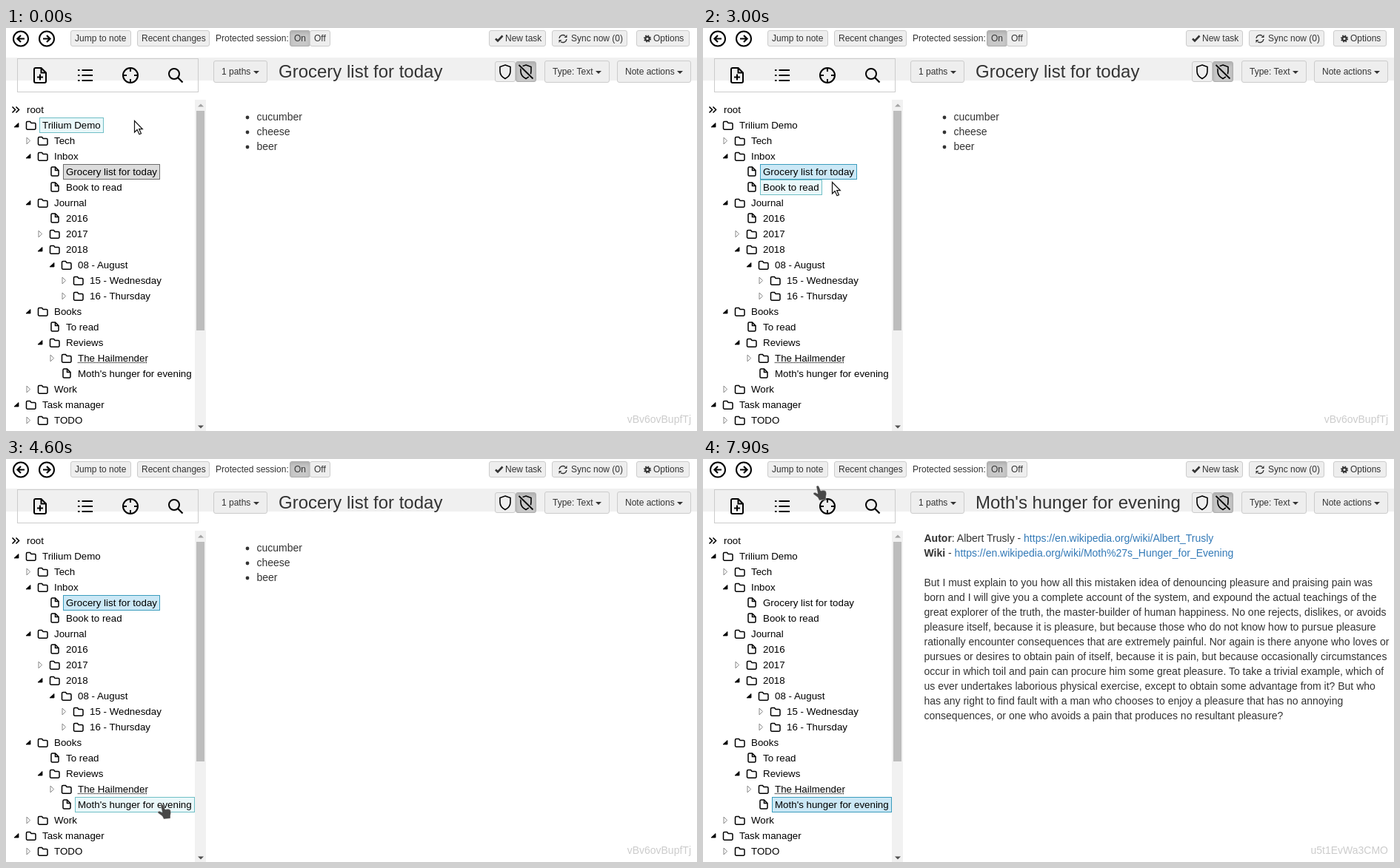
These frames come from a looping animation (933x545 px, 8 s). An HTML page:

```html
<!DOCTYPE html>
<html lang="en">
<head>
<meta charset="utf-8">
<title>Note tree</title>
<style>
html, body { margin: 0; width: 100%; height: 100%; overflow: hidden; background: #fff; }
body { position: relative; font: 14px/20px "Liberation Sans", Arial, sans-serif; color: #333; }
div, svg { position: absolute; box-sizing: border-box; white-space: pre; }
svg { left: 0; top: 0; width: 933px; height: 545px; }
#stage { width: 933px; height: 545px; overflow: hidden; }
#header { width: 933px; height: 31px; background: #f0f0f0; }
#tools { left: 15px; top: 41px; width: 245px; height: 46px; border: 1px solid #ccc; }
#track { left: 255px; top: 97px; width: 15px; height: 448px; background: #f1f1f1; }
#thumb { left: 257px; top: 112px; width: 11px; height: 297px; background: #bdbdbd; }
.small { font-size: 12px; }
.btn { background: #eee; border: 1px solid #ccc; border-radius: 3px; font-size: 12px; }
.btn.on { background: #c8c8c8; border-color: #adadad; box-shadow: inset 0 3px 5px rgba(0,0,0,.125); }
.caret::after { content: ""; display: inline-block; margin-left: 3.3px; vertical-align: middle;
  border: 4px solid transparent; border-top-color: #333; border-bottom: 0; }
.label { height: 21px; padding: 0 3px; border: 1px solid transparent; font-size: 13.333px; line-height: 19px; color: #000; }
.dotted { text-decoration: underline dotted; }
.label.hover { background: #eaf8fa; border-color: #70bfc6; }
.label.idle { background: #dcdcdc; border-color: #6c6c6c; }
.label.active { background: #cbe8f6; border-color: #3b9cbd; }
#title { left: 368px; top: 44px; font-size: 24px; line-height: 30px; }
#noteId { right: 8px; top: 519px; color: #ccc; }
a { color: #337ab7; }
</style>
</head>
<body>
<div id="stage">
  <div id="header"></div>
  <div id="tools"></div>
  <div id="track"></div>
  <div id="thumb"></div>
  <div id="title"></div>
  <div id="list" style="left:338.5px;top:110px">cucumber
cheese
beer</div>
  <div id="article" style="left:298.5px;top:97px"><b>Autor</b>: Albert Trusly - <a>https://en.wikipedia.org/wiki/Albert_Trusly</a>
<b>Wiki</b> - <a>https://en.wikipedia.org/wiki/Moth%27s_Hunger_for_Evening</a>

But I must explain to you how all this mistaken idea of denouncing pleasure and praising pain was
born and I will give you a complete account of the system, and expound the actual teachings of the
great explorer of the truth, the master-builder of human happiness. No one rejects, dislikes, or avoids
pleasure itself, because it is pleasure, but because those who do not know how to pursue pleasure
rationally encounter consequences that are extremely painful. Nor again is there anyone who loves or
pursues or desires to obtain pain of itself, because it is pain, but because occasionally circumstances
occur in which toil and pain can procure him some great pleasure. To take a trivial example, which of
us ever undertakes laborious physical exercise, except to obtain some advantage from it? But who
has any right to find fault with a man who chooses to enjoy a pleasure that has no annoying
consequences, or one who avoids a pain that produces no resultant pleasure?</div>
  <div id="noteId"></div>
</div>
<script>
const stage = document.getElementById('stage');
const byId = id => document.getElementById(id);

function box(cls, x, y, text, w, h) {
  const el = document.createElement('div');
  el.className = cls;
  el.textContent = text;
  el.style.left = x + 'px';
  el.style.top = y + 'px';
  if (w) el.style.width = w + 'px';
  if (h) { el.style.height = h + 'px'; el.style.lineHeight = h - 2 + 'px'; }
  stage.append(el);
  return el;
}

function button(x, y, w, h, text, pad, cls = '') {
  box('btn ' + cls, x, y, text, w, h).style.paddingLeft = pad + 'px';
}

button(87, 3, 82, 22, 'Jump to note', 5);
button(177, 3, 98, 22, 'Recent changes', 5);
box('small', 283, 4, 'Protected session:');
button(383, 3, 28, 22, 'On', 5, 'on');
button(410, 3, 28, 22, 'Off', 5);
button(652, 3, 77, 22, 'New task', 21);
button(737, 3, 102, 22, 'Sync now (0)', 25);
button(851, 3, 72, 22, 'Options', 22);
button(280, 44, 73, 30, '1 paths', 10, 'caret');
button(660, 45, 28, 28, '', 0);
button(688, 45, 28, 28, '', 0, 'on');
button(727, 44, 88, 30, 'Type: Text', 10, 'caret');
button(825, 44, 100, 30, 'Note actions', 10, 'caret');

// Rows: depth, kind (o open, c closed, d document), label
const article = "Moth's hunger for evening", grocery = 'Grocery list for today';
const rows = `0r root|1o Trilium Demo|2c Tech|2o Inbox|3d ${grocery}|3d Book to read|2o Journal|3d 2016|3c 2017
|3o 2018|4o 08 - August|5c 15 - Wednesday|5c 16 - Thursday|2o Books|3d To read|3o Reviews|4c The Hailmender
|4d ${article}|2c Work|1o Task manager|2c TODO|2c `.replace(/\n/g, '').split('|')
  .map(s => ({ depth: +s[0], kind: s[1], text: s.slice(3) }));

const path = (d, fill = 'none', stroke = '#000', width = 1.5) =>
  `<path d="${d}" fill="${fill}" stroke="${stroke}" stroke-width="${width}"/>`;
const at = (x, y, art) => `<g transform="translate(${x} ${y})">${art}</g>`;
const ring = (x, y, r, w) => `<circle cx="${x}" cy="${y}" r="${r}" fill="none" stroke="#000" stroke-width="${w}"/>`;

const folder = path('M1 3v7.2a1.5 1.5 0 0 0 1.5 1.5h9.5a1.5 1.5 0 0 0 1.5-1.5V4.4a1.5 1.5 0 0 0-1.5-1.5H7.6L6 1H2.5A1.5 1.5 0 0 0 1 2.5z');
const sheet = path('M6.5 1h-4A1.5 1.5 0 0 0 1 2.5v9A1.5 1.5 0 0 0 2.5 13h7A1.5 1.5 0 0 0 11 11.500V5.500zV5.500H11');
const opened = path('M3 -3v5.500h-6z', '#000', '#000', .8);
const closed = path('M-2 -4.500l4.500 4.500-4.500 4.500z', '#fff', '#888', 1);

let art = '';
rows.forEach((row, i) => {
  const x = row.depth ? 33 + 16 * row.depth : 28, y = 110.5 + 21 * i;
  row.label = box('label', x - 4, 100 + 21 * i, row.text);
  if (row.kind === 'r') art += path(`M8.500 ${y - 4}l4 4-4 4m5-8l4 4-4 4`, 'none', '#000', 1.6);
  else if (row.kind === 'd') art += at(x - 21, y - 7.5, sheet);
  else art += at(x - 22.5, y - 6, folder) + at(x - 35, y, row.kind === 'o' ? opened : closed);
});
rows[16].label.classList.add('dotted');

// Header icons
art += ring(20, 14.5, 10, 2) + path('M25 14.500h-9m4-4.500l-4.500 4.500 4.500 4.500', 'none', '#000', 2.2);
art += ring(55, 14.5, 10, 2) + path('M50 14.500h9m-4-4.500l4.500 4.500-4.500 4.500', 'none', '#000', 2.2);
art += path('M661 14.500l3 3 6.500-7', 'none', '#333', 2.6);
art += path('M747 14a5 5 0 0 1 8-3.500M757 15a5 5 0 0 1-8 3.500', 'none', '#333', 1.4)
  + path('M757.500 9v4h-4zM746.500 20v-4h4z', '#333', 'none');
art += `<g fill="none" stroke="#333"><circle cx="866" cy="14.5" r="2.7" stroke-width="2.2"/>
  <circle cx="866" cy="14.5" r="4.2" stroke-width="1.7" stroke-dasharray="1.65"/></g>`;

// Toolbar icons
art += path('M47.500 54H40a2 2 0 0 0-2 2v16a2 2 0 0 0 2 2h12a2 2 0 0 0 2-2V60.500zv6.500H54M46 62.500v8m-4-4h8', 'none', '#000', 2);
art += path('M97 57h2.500m3 0h14.500m-20 7h2.500m3 0h14.500m-20 7h2.500m3 0h14.500', 'none', '#000', 2);
art += ring(168, 64, 10, 2) + path('M168 54v5m0 10v5m-10-10h5m10 0h5', 'none', '#000', 2);
art += ring(227, 62, 7, 2) + path('M232 67l6.500 6.500', 'none', '#000', 2.2);

// Shields
const shield = path('M0 -9l7 2.500v6C7 4 4 7.500 0 9.500-4 7.500-7 4-7 -.500v-6z', 'none', '#000', 1.6);
art += at(674, 59, shield) + at(702, 59, shield + path('M-9 -9l18 18', 'none', '#c8c8c8', 4.5) + path('M-9.500 -9l19 18.500', 'none', '#000', 1.8));

// Scrollbar arrows and list bullets
art += path('M259 106.500l4-4 4 4z', '#a3a3a3', 'none') + path('M259 537.500l4 4 4-4z', '#505050', 'none');
art += '<g id="bullets" fill="#333">' + [0, 1, 2].map(i => `<circle cx="326" cy="${121 + 20 * i}" r="2.4"/>`).join('') + '</g>';

art += '<g id="cursor">'
  + '<g id="arrow">' + path('M.5 .5v15.500l3.600-3.400 2.900 6.200 2.500-1.100-2.800-6.100h4.600z', '#fff', '#111', 1.2) + '</g>'
  + '<g id="hand">' + path('M-2 1.500Q-1 -1 1.200 .6L4 7Q8 5.500 11 7.500 12.500 11 11 15V19L2 20 0 16-6 11.500Q-6.500 9-3.500 9.200L0 11z', '#484848', '#fff', .4) + '</g>'
  + '<g id="beam">' + path('M-3 -8.500h2.500l.5 .5 .5-.5h2.500M0 -8v16M-3 8.500h2.500l.5-.5 .5 .5h2.500', 'none', '#333', 1) + '</g></g>';
stage.insertAdjacentHTML('beforeend', `<svg viewBox="0 0 933 545">${art}</svg>`);

// Pointer keys: time, x, y
const keys = [
  [0, 173, 125], [200, 173, 125], [500, 174, 183], [600, 174, 183], [900, 174, 192],
  [2800, 174, 192], [3600, 174, 257], [3700, 185, 282], [4600, 211, 467],
  [6100, 211, 467], [6300, 258, 466], [6400, 258, 466], [6600, 310, 465], [6700, 310, 465],
  [6800, 333, 414], [6900, 333, 414], [7000, 347, 326], [7100, 347, 326],
  [7600, 206, 110], [7700, 175, 46], [7800, 175, 46], [7900, 155, 36], [8000, 155, 36]
];
const LOOP = 8000, TICK = 100;

function pointer(t) {
  const i = keys.findIndex(k => k[0] > t);
  const [t0, x0, y0] = keys[i - 1], [t1, x1, y1] = keys[i];
  const p = (t - t0) / (t1 - t0);
  return [Math.round(x0 + (x1 - x0) * p), Math.round(y0 + (y1 - y0) * p)];
}

const spans = rows.map(({ label }) => [label.offsetLeft, label.offsetLeft + label.offsetWidth]);

function render(t) {
  const [x, y] = pointer(t);
  const over = x < 255 && y >= 100 ? Math.floor((y - 100) / 21) : -1;
  const selected = t < 5200 ? 4 : 17;
  rows.forEach(({ label }, i) => {
    label.classList.toggle('idle', i === selected && t < 1500);
    label.classList.toggle('active', i === selected && t >= 1500);
    label.classList.toggle('hover', i === over && i !== selected);
  });

  const onLabel = over >= 0 && x >= spans[over][0] && x <= spans[over][1];
  const onTools = y < 97 && x < 260;
  const kind = onLabel || onTools ? 'hand' : x > 325 ? 'beam' : 'arrow';
  for (const id of ['arrow', 'hand', 'beam']) byId(id).style.display = id === kind ? '' : 'none';
  byId('cursor').setAttribute('transform', `translate(${x} ${y})`);

  const reading = t >= 5300;
  byId('title').textContent = reading ? article : grocery;
  byId('noteId').textContent = reading ? 'u5t1EvWa3CMO' : 'vBv6ovBupfTj';
  byId('article').style.display = reading ? '' : 'none';
  byId('list').style.display = byId('bullets').style.display = reading ? 'none' : '';
}

function frame() {
  const t = performance.now() % LOOP;
  render(Math.floor(t / TICK) * TICK);
  requestAnimationFrame(frame);
}
frame();
</script>
</body>
</html>
```
